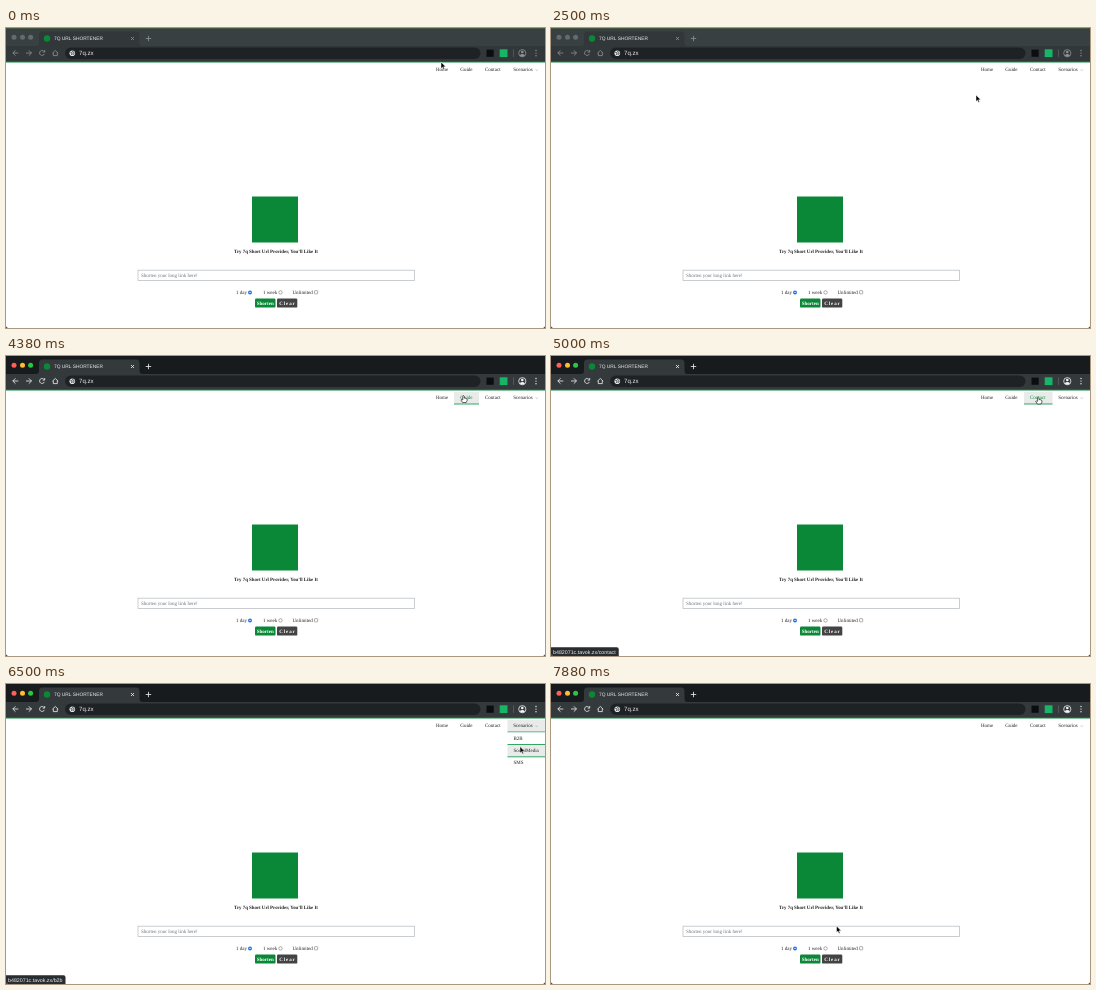
Recreate the animation shown at these times as an HTML page. Size 539x300 px, loop 8 s.

```html
<!DOCTYPE html>
<html lang="en">
<head>
<meta charset="utf-8">
<title>Short links</title>
<style>
  html, body { margin: 0; width: 100%; height: 100%; overflow: hidden; background: #111; }
  svg { display: block; width: 100vw; height: 100vh; }
  text { font: 5px "Liberation Serif", "Times New Roman", serif; fill: #222; white-space: pre; text-rendering: geometricPrecision; }
  .ui text { font-family: "Liberation Sans", Arial, sans-serif; fill: #eceef0; }
  .bold { font-weight: bold; }
  .mid { text-anchor: middle; }
  .white { fill: #fff; }
  .green { fill: #0b8738; }

  .strip { fill: #181b1e; }
  .bar { fill: #34393c; }
  .icons { fill: none; stroke: #f1f3f4; stroke-width: .8; }
  .icons .solid { fill: #f1f3f4; stroke: none; }
  .r { fill: #ff5f57; } .y { fill: #febc2e; } .g { fill: #28c840; }
  .idle .strip { fill: #384042; }
  .idle .bar { fill: #32383a; }
  .idle .icons { stroke: #8d9396; }
  .idle .icons .solid { fill: #8d9396; }
  .idle .light { fill: #646b6e; }
  .edge { fill: #4b5c40; visibility: hidden; }
  .idle .edge { visibility: visible; }

  .item .back, .item .line { visibility: hidden; }
  .item .back { fill: #e9eaea; }
  .item .line { fill: #35a566; }
  .item.on .back, .item.on .line { visibility: inherit; }
  .item.ink text { fill: #0b8738; }
  .off { visibility: hidden; }
</style>
</head>
<body>
<svg viewBox="0 0 539 300" preserveAspectRatio="none">
  <path d="M0 0H539V297.500Q539 300 536.500 300H2.500Q0 300 0 297.500Z" fill="#fff"/>

  <g id="chrome" class="ui">
    <rect class="strip" width="539" height="18.500"/>
    <rect class="edge" width="539" height=".8"/>
    <path class="bar" d="M0 18H30Q33 18 33 15V7Q33 3.500 36.500 3.500H130Q133.500 3.500 133.500 7V15Q133.500 18 136.500 18H539V34H0Z"/>
    <circle class="light r" cx="8" cy="9.300" r="2.500"/>
    <circle class="light y" cx="16.500" cy="9.300" r="2.500"/>
    <circle class="light g" cx="24.600" cy="9.300" r="2.500"/>
    <circle class="green" cx="41" cy="10.500" r="3.200"/>
    <text x="48" y="12.300" style="font-size:4.850px">7Q URL SHORTENER</text>
    <rect x="59" y="19.500" width="415.500" height="11.500" rx="5.750" fill="#1f2225"/>
    <g class="icons">
      <path d="M125 9l3 3m0-3l-3 3M142.500 7.800v5.400m-2.700-2.700h5.400"/>
      <path d="M12.300 25H6.800m2.700-2.700L6.800 25l2.700 2.700M20 25h5.500m-2.700-2.700L25.500 25l-2.700 2.700"/>
      <path d="M38.200 23.600A2.500 2.500 0 1 0 38.400 25.900M38.700 22v2.100h-2.100"/>
      <path d="M46.400 25.200L49.300 22.500L52.200 25.200M47.300 24.700V27.600H51.300V24.700"/>
      <circle cx="516.300" cy="25.200" r="3.600"/>
      <circle class="solid" cx="516.300" cy="24" r="1.300"/>
      <path class="solid" d="M513.700 27.300Q516.300 24.700 518.900 27.300L517.500 28.600H515Z"/>
      <circle class="solid" cx="530" cy="22.500" r=".7"/>
      <circle class="solid" cx="530" cy="25.100" r=".7"/>
      <circle class="solid" cx="530" cy="27.700" r=".7"/>
    </g>
    <circle cx="66.300" cy="25.200" r="2.800" fill="#e4e7e9"/>
    <path d="M64.200 24.200l1.700.6.200 1.300-1.100.5M66.600 22.900l.2 1.200 1.500.3M67 27l.4-1.200 1.200-.2" fill="none" stroke="#1f2225" stroke-width=".7"/>
    <text x="73" y="27.300" style="font-size:6.100px">7q.zx</text>
    <rect x="480.500" y="21.600" width="7.200" height="7.200" fill="#0c0d0e"/>
    <rect x="493.700" y="21.300" width="7.800" height="7.800" fill="#16b567"/>
    <rect x="507" y="21.500" width=".6" height="7.500" fill="#666c70"/>
  </g>
  <rect class="green" y="33.400" width="539" height="1.100"/>

  <g id="nav"></g>
  <path d="M529.500 41.600l1.200 1 1.200-1" fill="none" stroke="#999" stroke-width=".5"/>
  <g id="menu"><rect x="501.500" y="48.500" width="37.500" height="37" fill="#fff"/></g>

  <rect class="green" x="246" y="168.500" width="46" height="46"/>
  <text class="bold mid" x="270" y="224.700" style="font-size:4.870px">Try 7q Short Url Provider, You’ll Like It</text>

  <rect x="132" y="242.200" width="276.500" height="10.400" fill="#fff" stroke="#bcc1c5" stroke-width=".8"/>
  <text x="135" y="249.200" style="fill:#6c757d">Shorten your long link here!</text>

  <text x="230" y="266">1 day</text>
  <text x="257" y="266">1 week</text>
  <text x="286.500" y="266">Unlimited</text>
  <circle cx="244" cy="264.400" r="2" fill="#1a73f0"/>
  <circle cx="244" cy="264.400" r=".7" fill="#fff"/>
  <g fill="#fff" stroke="#777" stroke-width=".6">
    <circle cx="274.500" cy="264.400" r="1.700"/>
    <rect x="308.500" y="262.700" width="3.200" height="3.200" rx=".5"/>
  </g>

  <rect class="green" x="249" y="270.600" width="20.500" height="9" rx="1.200"/>
  <text class="bold mid white" x="259.300" y="276.800">Shorten</text>
  <rect x="271" y="270.600" width="20.300" height="9" rx="1.200" fill="#434345"/>
  <text class="bold white" x="273.300" y="276.800" letter-spacing=".9">Clear</text>

  <g id="status" class="ui">
    <path fill="#2a2d30"/>
    <text x="2" y="297.600" style="font-size:5.300px"></text>
  </g>

  <g id="cursor">
    <path id="arrow" d="M0 0V6.600L1.500 5.200L2.500 7.500L3.600 7L2.600 4.800H4.700Z" fill="#000" stroke="#fff" stroke-width=".5"/>
    <path id="hand" d="M-.7 .6Q0-.5 .7 .6V2.600Q2.900 2.500 3.600 3.600V5.100L2.700 7H-.9L-2.600 4.500Q-2.500 3.500-.7 4.400Z" fill="#fff" stroke="#000" stroke-width=".6"/>
  </g>
</svg>

<script>
const TICK = 125, COUNT = 64, FOCUS_TICK = 21;
const HOST = 'b482071c.tavok.zx';
const $ = id => document.getElementById(id);

// name: label, box x, box y, box width, text x, parent
const items = {
  home: ['Home', 424, 36, 24, 430, 'nav'],
  guide: ['Guide', 448, 36, 25, 454.3, 'nav'],
  contact: ['Contact', 473, 36, 28.5, 479, 'nav'],
  scenarios: ['Scenarios', 501.5, 36, 37.5, 507.3, 'nav'],
  b2b: ['B2B', 501.5, 48.5, 37.5, 507.5, 'menu'],
  socialmedia: ['SocialMedia', 501.5, 60.8, 37.5, 507.5, 'menu'],
  sms: ['SMS', 501.5, 73.1, 37.5, 507.5, 'menu']
};
const nodes = {};

function make(tag, attrs, parent) {
  const el = document.createElementNS('http://www.w3.org/2000/svg', tag);
  for (const key in attrs) el.setAttribute(key, attrs[key]);
  return parent.appendChild(el);
}

for (const name in items) {
  const [label, x, y, width, textX, parent] = items[name];
  const g = nodes[name] = make('g', { class: 'item' }, $(parent));
  make('rect', { class: 'back', x, y, width, height: 12 }, g);
  make('rect', { class: 'line', x, y: y + 11.5, width, height: 1 }, g);
  if (parent === 'menu') make('rect', { class: 'line', x, y: y - .8, width, height: 1 }, g);
  make('text', { x: textX, y: y + 7.3 }, g).textContent = label;
}

// tick, x, y of the pointer tip
const path = [
  [0, 435, 34], [4, 436, 44], [7, 436, 44], [10, 435, 48], [12, 434, 45],
  [13, 434, 45], [15, 430, 53], [17, 430, 53], [20, 425, 67], [21, 425, 64],
  [27, 425, 64], [28, 425, 63], [31, 433, 45], [33, 440, 42], [35, 457.5, 39.5],
  [38, 474, 41], [41, 494, 41], [44, 502.7, 40], [48, 514, 43], [52, 514, 62.5],
  [55, 513, 78], [56, 511, 80], [57, 500, 84], [59, 430, 121], [62, 297, 220], [63, 285.5, 242]
];
// tick, hovered item, hand pointer
const hovers = [
  [0, ''], [30, 'home', 1], [35, 'guide', 1], [38, 'contact', 1], [43, 'contact'],
  [45, 'scenarios'], [49, 'b2b', 1], [52, 'socialmedia'], [53, 'socialmedia', 1],
  [54, 'sms', 1], [57, '']
];
// tick, address shown in the corner
const links = [
  [0], [32, '/'], [34], [36, '/guide'], [40, '/contact'], [45],
  [50, '/b2b'], [53, '/socialmedia'], [55, '/sms'], [58]
];

const latest = (list, n) => list.filter(e => e[0] <= n).pop();
const show = (el, on) => el.classList.toggle('off', !on);

function pointAt(n) {
  const a = latest(path, n), b = path[path.indexOf(a) + 1] || a;
  const k = a === b ? 0 : (n - a[0]) / (b[0] - a[0]);
  return [a[1] + (b[1] - a[1]) * k, a[2] + (b[2] - a[2]) * k];
}

function draw(n) {
  $('chrome').classList.toggle('idle', n < FOCUS_TICK);
  $('cursor').setAttribute('transform', `translate(${pointAt(n)})`);

  const [, over, hand] = latest(hovers, n);
  const open = n >= 45 && n < 57;
  show($('hand'), hand);
  show($('arrow'), !hand);
  show($('menu'), open);
  for (const name in nodes) {
    const on = name === over || (open && name === 'scenarios');
    nodes[name].classList.toggle('on', on);
    nodes[name].classList.toggle('ink', !!hand && name === over);
  }

  const link = latest(links, n)[1];
  show($('status'), link);
  if (link) {
    const [box, label] = $('status').children;
    label.textContent = HOST + (link === '/' ? '' : link);
    const w = label.getComputedTextLength() + 5;
    box.setAttribute('d', `M0 291.300H${w - 2}q2 0 2 2V300H2.500Q0 300 0 297.500Z`);
  }
}

let last = -1;
const start = performance.now();
function loop() {
  const n = Math.floor((performance.now() - start) / TICK) % COUNT;
  if (n !== last) draw(last = n);
  requestAnimationFrame(loop);
}
loop();
</script>
</body>
</html>
```
